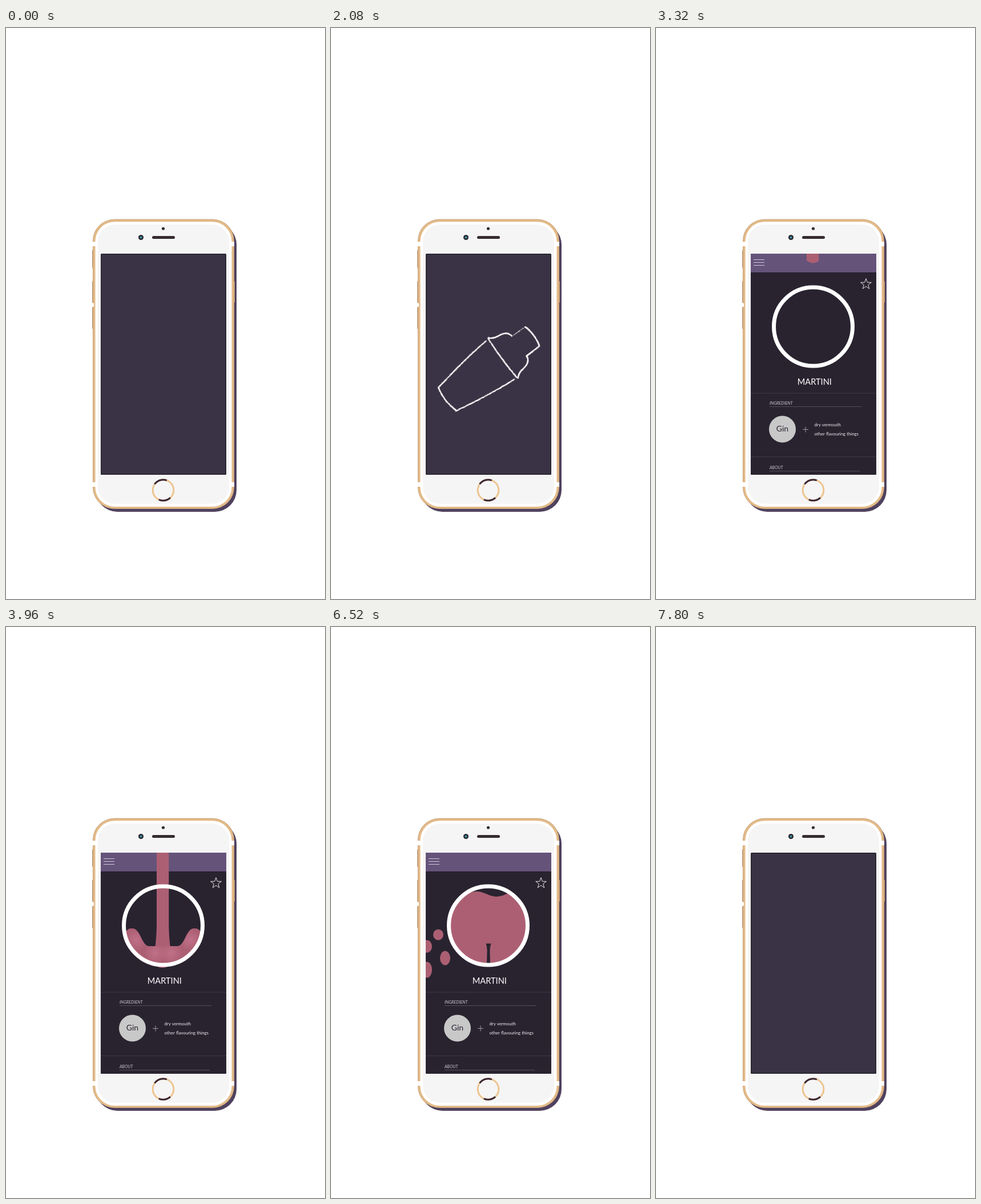
An HTML page with a canvas that plays this animation: 559 by 1002 pixels, repeating every 8560 ms.

```html
<!DOCTYPE html>
<html lang="en">
<head>
<meta charset="utf-8">
<title>Cocktail app</title>
<style>
html, body { margin: 0; width: 100%; height: 100%; overflow: hidden; background: #fff; }
canvas { display: block; }
</style>
</head>
<body>
<canvas id="stage" width="559" height="1002"></canvas>
<script>
const W = 559, H = 1002, LOOP = 8560, STEP = 40;
const INK = '#292330', PINK = '#ac5f73', LIGHT = '#c5758f', GOLD = '#e3ba88';
const SCREEN = [166, 396, 220, 388];
const RING = { x: 275.5, y: 524, r: 69 };
const stage = document.getElementById('stage').getContext('2d');

function layer(paint) {
  const c = document.createElement('canvas');
  c.width = W; c.height = H;
  const g = c.getContext('2d');
  if (paint) paint(g);
  return g;
}
const clamp = v => Math.max(0, Math.min(1, v));
const ramp = (t, a, b) => clamp((t - a) / (b - a));
const ease = p => p < .5 ? 2 * p * p : 1 - 2 * (1 - p) ** 2;

function box(g, x, y, w, h, r, color) {
  g.fillStyle = color;
  g.beginPath(); g.roundRect(x, y, w, h, r); g.fill();
}
function oval(g, x, y, rx, ry, color) {
  g.fillStyle = color;
  g.beginPath(); g.ellipse(x, y, rx, ry, 0, 0, 7); g.fill();
}
function line(g, x1, y1, x2, y2, color, width = 1) {
  g.strokeStyle = color; g.lineWidth = width;
  g.beginPath(); g.moveTo(x1, y1); g.lineTo(x2, y2); g.stroke();
}
function arc(g, x, y, r, from, to, color, width) {
  g.strokeStyle = color; g.lineWidth = width;
  g.beginPath(); g.arc(x, y, r, from * Math.PI / 180, to * Math.PI / 180); g.stroke();
}
function text(g, s, x, y, font, color) {
  g.font = font + ' Lato, sans-serif';
  g.fillStyle = color;
  g.fillText(s, x, y);
}

let seed = 7;
const rnd = () => (seed = seed * 16807 % 2147483647) / 2147483647;

// Uneven chalk mark along a curve given as u in 0..1 -> [x, y].
function chalk(g, curve, strength = .96) {
  const n = 60;
  g.strokeStyle = '#fff'; g.lineCap = 'round';
  for (let i = 0; i < n; i++) {
    g.lineWidth = (1.5 + rnd()) * (strength < .6 ? .5 : 1);
    if (rnd() > strength) continue;
    const [x, y] = curve(i / n), [x2, y2] = curve((i + 1) / n);
    const j = (rnd() - .5) * .6;
    g.beginPath(); g.moveTo(x + j, y + j); g.lineTo(x2 + j, y2 + j); g.stroke();
  }
}
const straight = (x1, y1, x2, y2) => u => [x1 + (x2 - x1) * u, y1 + (y2 - y1) * u];
const bend = (x1, y1, cx, cy, x2, y2) => u => {
  const v = 1 - u;
  return [v * v * x1 + 2 * u * v * cx + u * u * x2, v * v * y1 + 2 * u * v * cy + u * u * y2];
};

const shaker = layer(g => {
  for (const s of [1, -1]) {
    const x = w => 278 + s * w, worn = s < 0;
    chalk(g, bend(x(0), 495.5, x(17), 496, x(21), 499));
    chalk(g, straight(x(21), 499, x(21.5), 527), worn ? .5 : .96);
    chalk(g, bend(x(22), 527, x(34), 528, x(36), 545), worn ? .8 : .96);
    chalk(g, bend(x(36), 545, x(37), 556, x(44), 562));
    chalk(g, u => [x(41.5 - 16 * u ** 1.4), 568 + 116 * u]);
  }
  chalk(g, bend(235, 563, 278, 566, 321, 563));
  chalk(g, bend(252, 684, 278, 691, 302, 683));
});

const glass = layer(g => {
  for (const s of [1, -1]) {
    const x = w => 277 + s * w;
    chalk(g, straight(x(0), 479.5, x(77), 481));
    chalk(g, straight(x(77), 482, x(2), 576));
    chalk(g, bend(x(0), 664, x(6), 670, x(36), 675));
    chalk(g, straight(x(0), 676, x(36), 675));
  }
  chalk(g, straight(277, 576, 277, 665));
});

const phone = layer(g => {
  box(g, 157, 342, 247, 507, 38, '#50425f');
  for (const y of [390, 444, 490]) box(g, 151, y, 3, y < 400 ? 31 : 38, 1, '#b99a7c');
  box(g, 398, 444, 3, 38, 1, '#c99f72');
  box(g, 152, 335.5, 248, 508.5, 38, '#b9966f');
  box(g, 152.7, 336.3, 246.5, 507, 37, GOLD);
  for (const y of [375, 797]) {
    box(g, 152, y, 5, 8, 0, '#fff');
    box(g, 395, y, 5, 8, 0, '#fff');
  }
  box(g, 151, 483, 3, 6, 0, '#fff');
  box(g, 156.5, 340, 239, 500, 34, '#fff');
  box(g, 161, 345, 230, 490, 30, '#f5f5f5');
  box(g, 256, 365, 40, 5, 2.5, '#352c30');
  oval(g, 275.5, 352, 2.6, 2.6, '#352c30');
  oval(g, 236.5, 367.5, 4.5, 4.5, '#29272f');
  oval(g, 236.5, 367.5, 2, 2, '#3c98a5');
  arc(g, 275.5, 811, 18.3, 0, 360, '#edc48f', 3);
  arc(g, 275.5, 811, 18.3, -145, -70, '#3b2732', 3);
  arc(g, 275.5, 811, 18.3, 47, 115, '#3b2732', 3);
  box(g, ...SCREEN, 1.5, '#25232b');
  box(g, 167.5, 397.5, 217, 385, 0, '#3a3345');
});

function star(g, x, y, r) {
  g.beginPath();
  for (let i = 0; i < 10; i++) {
    const a = i * Math.PI / 5 - Math.PI / 2, d = i % 2 ? r * .4 : r;
    g.lineTo(x + d * Math.cos(a), y + d * Math.sin(a));
  }
  g.closePath(); g.stroke();
}

const pageBack = layer(g => {
  box(g, ...SCREEN, 1.5, INK);
  box(g, 166, 396, 220, 33, [1.5, 1.5, 0, 0], '#65537a');
  line(g, 166, 429.5, 386, 429.5, '#1e1925');
  for (let i = 0; i < 3; i++) line(g, 171, 406.5 + 5 * i, 190, 406.5 + 5 * i, '#d2c9da');
  g.strokeStyle = '#e4e1e7';
  star(g, 368, 449.5, 9.8);

  g.textAlign = 'center';
  text(g, 'MARTINI', 277.8, 625.7, '14.6px', '#fff');
  oval(g, 221.5, 704, 23.5, 23.5, '#c8c8c8');
  text(g, 'Gin', 221.5, 708, '14px', INK);
  g.textAlign = 'left';
  for (const y of [641, 752.5]) line(g, 166, y, 386, y, '#3e3847');
  text(g, 'INGREDIENT', 199, 661, 'italic 7.3px', '#c8c5cb');
  text(g, 'ABOUT', 199, 773.5, 'italic 7.3px', '#c8c5cb');
  line(g, 199, 664.5, 360, 664.5, '#55505d');
  line(g, 199, 777.5, 357, 777.5, '#55505d');
  line(g, 257, 704.5, 267, 704.5, '#9b98a0');
  line(g, 262, 699.5, 262, 709.5, '#9b98a0');
  text(g, 'dry vermouth', 277.5, 699, '7.8px', '#eeecef');
  text(g, 'other flavouring things', 277.5, 714.5, '7.8px', '#eeecef');
});

function stream(g, t) {
  const top = 390 + 210 * ramp(t, 4600, 4960);
  const end = 390 + 204 * ramp(t, 3280, 3720);
  if (end <= 396 || top >= end) return;
  const flare = y => 3 * ramp(y, 520, 565) ** 2;
  g.fillStyle = PINK;
  g.beginPath();
  for (let y = top; y <= end; y += 3) g.lineTo(264 - flare(y), y);
  g.quadraticCurveTo(275, end + 8, 286, end);
  for (let y = end; y >= top; y -= 3) g.lineTo(285.3 + flare(y), y);
  g.fill();
}

// Height of the liquid: splash walls at the sides, then a travelling swell.
function surface(x, t) {
  const level = 594 - 34 * ramp(t, 3700, 3960) - 110 * ramp(t, 3960, 5160) + 18.5 * ramp(t, 6160, 6520);
  const crown = 31 * ramp(t, 3700, 3960) * (1 - ramp(t, 3960, 4800));
  const swell = 4.5 * ramp(t, 3960, 4400) * (1 - .7 * ramp(t, 6520, 7200));
  const d = Math.abs(x - RING.x);
  const wall = ease(ramp(d, 25, 53)) - .3 * ramp(d, 57, 68) ** 2;
  return level - crown * wall + swell * Math.cos(Math.PI * (x - 290) / 35 - (t - 6520) / 160);
}

function glow(g, x, y, r, alpha) {
  const grad = g.createRadialGradient(x, y, 0, x, y, r);
  grad.addColorStop(0, LIGHT);
  grad.addColorStop(1, '#c5758f00');
  g.globalAlpha = alpha;
  oval(g, x, y, r, r, grad);
  g.globalAlpha = 1;
}

// A dark glass grows from the bottom: first its stem, then the bowl.
function stem(g, t) {
  const top = 592 - 36.5 * ramp(t, 6280, 6520) - 16 * ramp(t, 6520, 6680);
  if (top >= 591) return;
  g.fillStyle = INK;
  g.beginPath();
  for (const s of [-1, 1]) {
    const x = w => 276 + s * w;
    g.moveTo(276, top); g.lineTo(x(4.5), top);
    g.quadraticCurveTo(x(2.6), top + 5, x(2.4), top + 12);
    g.lineTo(x(3), 592); g.lineTo(276, 592);
  }
  g.fill();
  const open = ramp(t, 6680, 7160);
  if (!open) return;
  for (const s of [-1, 1]) line(g, 276 + s * 2, 541, 276 + s * (2 + 38 * open), 541 - 46 * open, INK, 4);
}

function liquid(g, t) {
  if (t < 3700) return;
  g.save();
  g.beginPath(); g.arc(RING.x, RING.y, RING.r - 1, 0, 7); g.clip();
  g.beginPath(); g.moveTo(200, 600);
  for (let x = 200; x <= 352; x += 2) g.lineTo(x, surface(x, t));
  g.lineTo(352, 600); g.clip();
  g.fillStyle = PINK;
  g.fillRect(200, 440, 152, 160);
  const shade = .8 * ramp(t, 3700, 3960) * (1 - ramp(t, 3960, 4700));
  for (const s of [-1, 1]) {
    glow(g, RING.x + s * 47, 549, 19, shade);
    glow(g, RING.x + s * 14, 572, 20, shade);
  }
  stem(g, t);
  g.restore();
}

function lobe(g, x, y, rx, ry) {
  g.fillStyle = PINK;
  g.beginPath();
  for (let a = 0; a < 2 * Math.PI; a += .1) {
    const r = 1 + .07 * Math.sin(3 * a + 1);
    g.lineTo(x + rx * r * Math.cos(a), y + ry * r * Math.sin(a));
  }
  g.fill();
}

function splash(g, t) {
  const rise = ramp(t, 5120, 5360), s = Math.max(0, t - 5360) / 1000;
  if (!rise || t > 6000) return;
  const lift = 40 * (1 - rise) ** 2 - 160 * s + 330 * s * s, drift = 55 * s;
  lobe(g, 273, 454 + lift, 21, 25);
  lobe(g, 236 - drift, 461 + lift, 9.5, 10.5);
  lobe(g, 340 + drift * 1.6, 495 + lift, 11, 13.5);
  g.save();
  g.globalAlpha = .9 * rise * (1 - ramp(t, 5360, 5800));
  g.filter = 'blur(1.3px)';
  g.translate(0, lift * .6);
  g.fillStyle = LIGHT;
  g.beginPath();
  g.ellipse(271, 468, 13, 20, 0, 0, 7);
  g.ellipse(269, 511, 21.5, 32, 0, 0, 7);
  g.ellipse(274, 543, 15, 20, 0, 0, 7);
  g.fill();
  g.restore();
}

// Drops thrown out to one side; s is the time in seconds around their shrinking.
function spray(g, s, flip, dy) {
  const size = ramp(s, -.95, -.6) * (1 - ramp(s, 0, .3));
  for (let i = 0; i < 4; i++) {
    const x = (i % 2 ? 168 : 188 + 6 * i) - 75 * s;
    const y = 540 + 20.5 * i + dy + 150 * s + 65 * s * s;
    oval(g, flip ? 552 - x : x, y, 9 * size, (9.5 + 1.5 * i) * size, PINK);
  }
}

const page = layer();
function drawPage(t) {
  page.clearRect(0, 0, W, H);
  page.drawImage(pageBack.canvas, 0, 0);
  page.save();
  page.beginPath(); page.rect(...SCREEN); page.clip();
  stream(page, t);
  liquid(page, t);
  spray(page, (t - 6520) / 1000, false, 0);
  spray(page, (t - 6180) / 1000, true, -14);
  splash(page, t);
  arc(page, RING.x, RING.y, RING.r, 0, 360, '#fff', 7);
  page.restore();
}

function show(source, alpha) {
  if (alpha <= 0) return;
  stage.globalAlpha = alpha;
  stage.drawImage(source.canvas, 0, 0);
  stage.globalAlpha = 1;
}

function render(t) {
  stage.fillStyle = '#fff';
  stage.fillRect(0, 0, W, H);
  show(phone, 1);
  show(glass, ramp(t, 40, 160) * (1 - ramp(t, 560, 960)));

  const pageIn = ramp(t, 2720, 3120);
  if (pageIn < 1) {
    stage.save();
    stage.translate(273, 594);
    stage.rotate(2 * Math.PI * ease(ramp(t, 1840, 2720)));
    stage.translate(-273, -594);
    show(shaker, ramp(t, 1120, 1600));
    stage.restore();
  }
  const pageAlpha = pageIn * (1 - ramp(t, 7360, 7800));
  if (pageAlpha > 0) {
    drawPage(t);
    show(page, pageAlpha);
  }
}

const start = performance.now();
function tick() {
  const t = (performance.now() - start) % LOOP;
  render(Math.floor(t / STEP) * STEP);
  requestAnimationFrame(tick);
}
tick();
</script>
</body>
</html>
```
